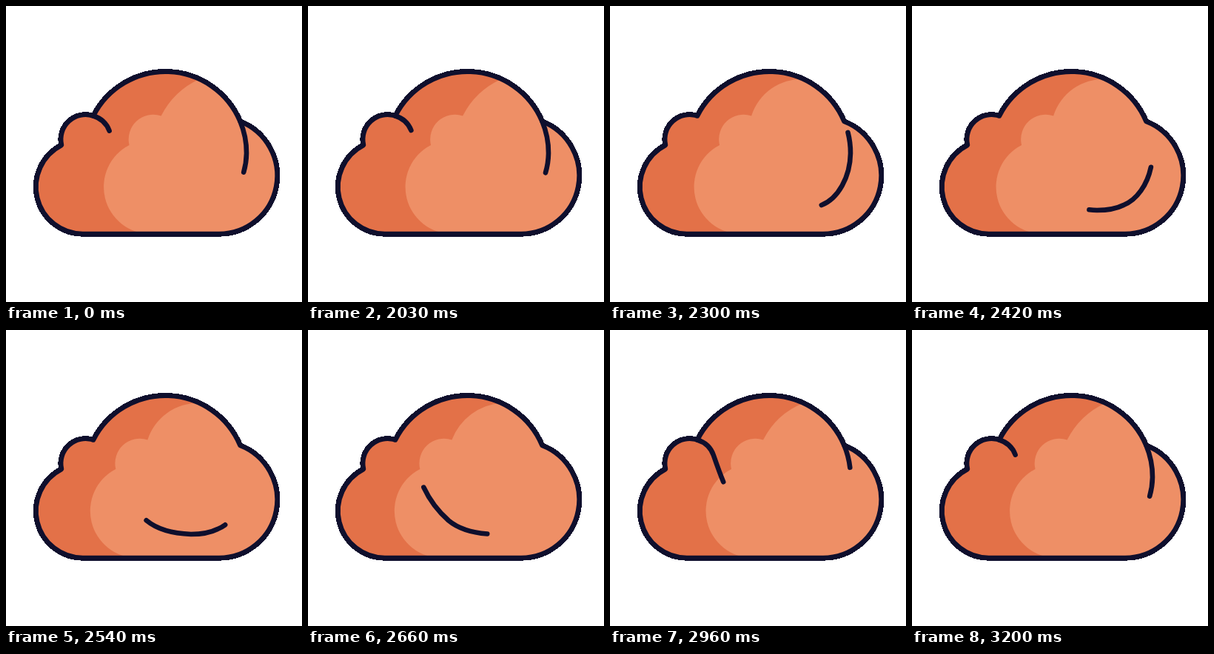
An HTML page for the animation above (3230 ms loop, 400 by 400 pixels).

```html
<!DOCTYPE html>
<html lang="en">
<head>
<meta charset="utf-8">
<title>Cloud</title>
<style>
  html, body { margin: 0; width: 100%; height: 100%; overflow: hidden; background: #fff; }
  svg { display: block; width: 100vw; height: 100vh; }
  .line { fill: none; stroke: #0f0f2d; stroke-width: 6.6; stroke-linecap: round; stroke-linejoin: round; }
  .rim { stroke-width: 7.3; shape-rendering: crispEdges; }
</style>
</head>
<body>
<svg viewBox="0 0 400 400">
  <defs>
    <path id="cloud" d="M104 308A63.5 63.5 0 0 1 75 188A33.4 33.4 0 0 1 118 148.5A109.4 109.4 0 0 1 316.5 156A78.7 78.7 0 0 1 287.5 308Z"/>
    <clipPath id="inside"><use href="#cloud"/></clipPath>
  </defs>
  <!-- hard outer edge below the smooth outline -->
  <use href="#cloud" class="line rim"/>
  <use href="#cloud" fill="#e37148"/>
  <g clip-path="url(#inside)">
    <path id="light" fill="#ee8f66"/>
  </g>
  <use href="#cloud" class="line"/>
  <path id="swoosh" class="line" d="M316.5 156A109.4 109.4 0 0 1 325 199C324.5 231 308.5 260 286 269C275 274.5 262 276 250 276C225 275 205 270 190 257.5C174.3 243.5 162.5 228 153.5 206C148.5 194 144.3 182 139.8 169A33.4 33.4 0 0 0 118 148.5"/>
</svg>
<script>
  const LOOP = 3230, HOLD = 2030, STEP = 30;
  const DASH = 113, CYCLE = 376, REST = 70;
  const light = document.getElementById('light');
  const swoosh = document.getElementById('swoosh');
  swoosh.setAttribute('stroke-dasharray', `${DASH} ${CYCLE - DASH}`);

  // Smooth ease from 0 to 1 between two times
  function ease(t, from, to) {
    const x = Math.min(1, Math.max(0, (t - from) / (to - from)));
    return x * x * (3 - 2 * x);
  }

  // Left lobes slide by dx while the top point stays, so the upper arc bulges
  function lightPath(swell) {
    const dx = 91.6 - 18.5 * swell;
    const r = 109.4 - 38.4 * swell;
    return `M${104 + dx} 308A63.5 63.5 0 0 1 ${75 + dx} 188` +
      `A33.4 33.4 0 0 1 ${118 + dx} 148.5` +
      `A${r} ${r} 0 0 1 261.4 98.7H400V308Z`;
  }

  function draw(ms) {
    let t = ms % LOOP;
    t = t < HOLD ? 0 : HOLD + Math.floor((t - HOLD) / STEP) * STEP;

    const tail = REST - DASH + CYCLE * ease(t, 2000, 3200);
    swoosh.setAttribute('stroke-dashoffset', -tail);
    light.setAttribute('d', lightPath(ease(t, 2000, 2300) - ease(t, 2500, 3100)));
  }

  const start = performance.now();
  function tick() {
    draw(performance.now() - start);
    requestAnimationFrame(tick);
  }
  tick();
</script>
</body>
</html>
```
